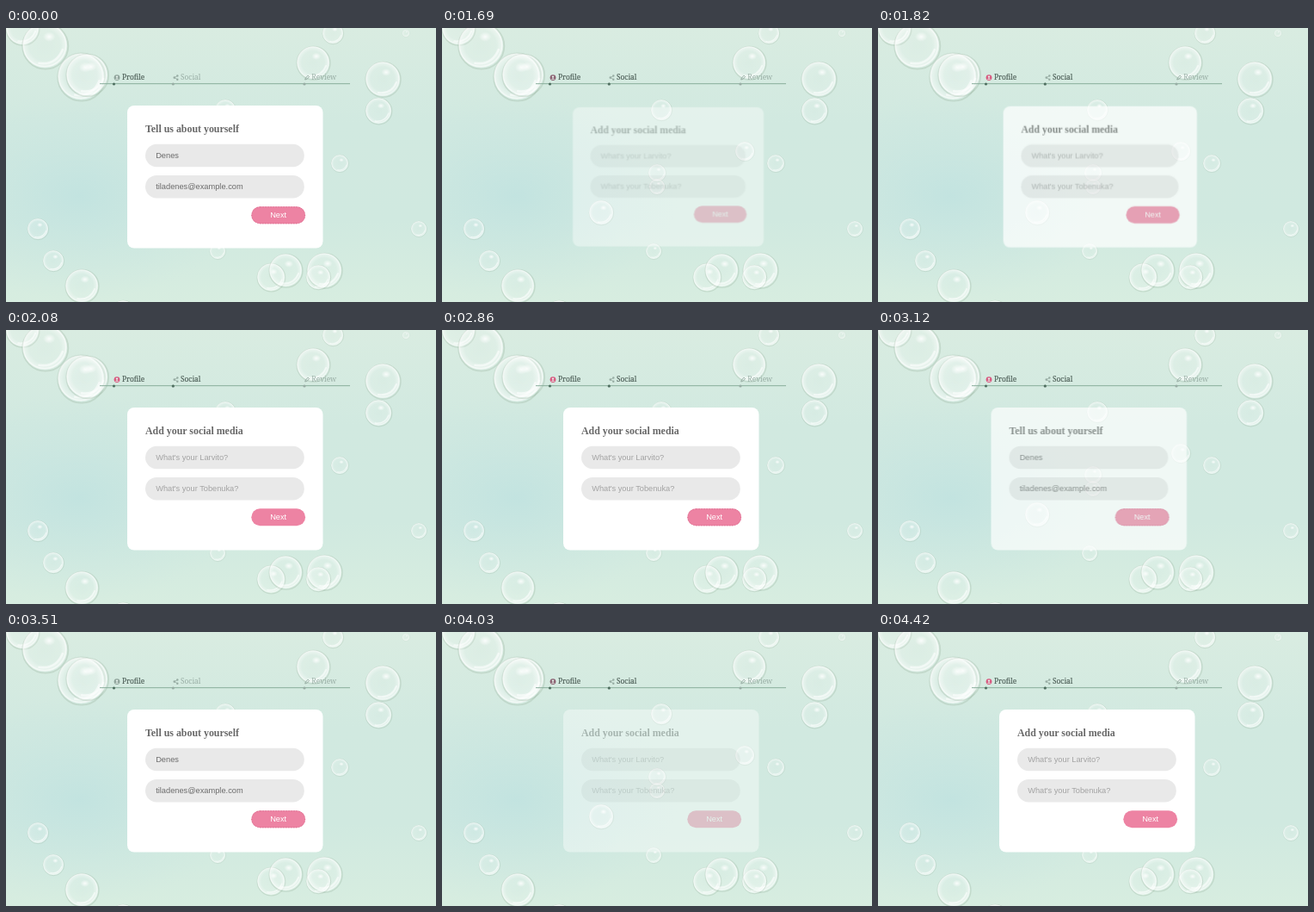
Animation, 500 px wide and 318 px high, one loop 5.07 s. Source, as an HTML page:

```html
<!DOCTYPE html>
<html lang="en">
<head>
<meta charset="utf-8">
<title>Step form</title>
<style>
  html, body { margin: 0; width: 100%; height: 100%; overflow: hidden; background: #d3eae0; }
  svg { display: block; width: 100%; height: 100%; }
  .nav { font: 8.3px "Noto Serif", serif; }
  .title { font: bold 11.9px "Liberation Serif", "Times New Roman", serif; fill: #686868; }
  .field, .next { font: 9.25px "Liberation Sans", Arial, sans-serif; }
  .next { fill: #fff; text-anchor: middle; }
  .card { transform-box: fill-box; transform-origin: center; }
  .muted { fill: #98ada4; color: #98ada4; }
  .active { fill: #4b5c55; stroke: #4b5c55; stroke-width: .15; }
</style>
</head>
<body>
<svg viewBox="0 0 500 318" preserveAspectRatio="none">
  <defs>
    <linearGradient id="sky" x2="0" y2="1">
      <stop offset="0" stop-color="#d9ece1"/>
      <stop offset=".35" stop-color="#d1e9e0"/>
      <stop offset=".7" stop-color="#d0e9e0"/>
      <stop offset="1" stop-color="#d7ede0"/>
    </linearGradient>
    <radialGradient id="pool">
      <stop offset="0" stop-color="#bfe2e0" stop-opacity=".8"/>
      <stop offset="1" stop-color="#c8e5e1" stop-opacity="0"/>
    </radialGradient>
    <radialGradient id="film">
      <stop offset="0" stop-color="#fff" stop-opacity=".1"/>
      <stop offset=".7" stop-color="#fff" stop-opacity=".16"/>
      <stop offset=".93" stop-color="#fff" stop-opacity=".5"/>
      <stop offset="1" stop-color="#fff" stop-opacity=".3"/>
    </radialGradient>
    <radialGradient id="glow">
      <stop offset="0" stop-color="#fff" stop-opacity=".85"/>
      <stop offset="1" stop-color="#fff" stop-opacity="0"/>
    </radialGradient>
    <g id="bubble">
      <circle cx=".03" cy=".04" r="1.02" fill="none" stroke="#8fa894" stroke-opacity=".28" stroke-width=".07"/>
      <circle r="1" fill="url(#film)"/>
      <circle r=".95" fill="none" stroke="#fff" stroke-opacity=".5" stroke-width=".05"/>
      <ellipse cx=".2" cy="-.38" rx=".28" ry=".22" fill="url(#glow)"/>
      <path d="M-.25 .8Q.5 .9 .8 .2" fill="none" stroke="#fff" stroke-opacity=".55" stroke-width=".1" stroke-linecap="round"/>
    </g>
  </defs>

  <rect width="500" height="318" fill="url(#sky)"/>
  <ellipse cx="85" cy="195" rx="190" ry="120" fill="url(#pool)"/>
  <g id="bubbles"></g>

  <g class="nav">
    <path d="M109 64.7H400" stroke="#88ad9a"/>
    <g fill="#4f6f60">
      <circle cx="125.5" cy="65" r="1.6"/>
      <circle class="muted" cx="194.3" cy="65" r="1.6"/>
      <circle id="socialDot" cx="194.3" cy="65" r="1.6"/>
      <circle class="muted" cx="347" cy="65" r="1.6"/>
    </g>
    <g id="person">
      <circle cx="129" cy="57.6" r="3.4"/>
      <circle cx="129" cy="56.6" r="1.2" fill="#e4f1ea"/>
      <path d="M126.9 59.8Q129 56.8 131.1 59.8Z" fill="#e4f1ea"/>
    </g>
    <text class="active" x="135" y="60.2">Profile</text>
    <g class="muted">
      <path d="M199.3 55.5L195.8 57.6L199.3 59.7" fill="none" stroke="currentColor" stroke-width=".8"/>
      <circle cx="199.3" cy="55.5" r="1.2"/>
      <circle cx="195.8" cy="57.6" r="1.3"/>
      <circle cx="199.3" cy="59.7" r="1.2"/>
      <text id="socialIdle" x="203" y="60.2">Social</text>
      <path d="M347.7 60L348.4 58L351.2 55.1L352.7 56.6L349.8 59.4Z" fill="none" stroke="currentColor" stroke-width="1"/>
      <text x="355.3" y="60.2">Review</text>
    </g>
    <text id="socialActive" class="active" x="203" y="60.2">Social</text>
  </g>

  <g id="cards"></g>
</svg>
<script>
  const DURATION = 5070, TICKS = 39;
  const byId = id => document.getElementById(id);

  // Centre x, centre y, radius
  const bubbles = [
    [19, 0, 19], [45, 20, 26], [87, 56, 27], [94, 54, 24], [380, 6, 12], [465, 6, 4],
    [357, 40, 19], [438, 59, 20], [433, 96, 15], [388, 157, 10], [480, 233, 9],
    [37, 233, 12], [55, 270, 12], [88, 299, 19], [136, 331, 15], [246, 259, 9],
    [308, 289, 16], [325, 281, 19], [370, 281, 20], [363, 289, 14],
    [255, 95, 12], [352, 143, 11], [250, 168, 10], [250, 184, 9], [185, 214, 14]
  ];
  byId('bubbles').innerHTML = bubbles.map(([x, y, r]) =>
    `<use href="#bubble" transform="translate(${x} ${y}) scale(${r})"/>`).join('');

  const field = (y, text, color) => `
    <rect x="162" y="${y}" width="184.8" height="26.4" rx="13.2" fill="#e9e9e9"/>
    <text class="field" x="174.2" y="${y + 16}" fill="${color}">${text}</text>`;

  const card = (id, title, lines, color) => `
    <g id="${id}" class="card">
      <rect x="141" y="90" width="227.5" height="165.5" rx="8" fill="#fff"/>
      <text class="title" x="162" y="121">${title}</text>
      ${field(134.8, lines[0], color)}${field(171, lines[1], color)}
      <rect x="285.3" y="207.3" width="62.8" height="20" rx="10" fill="#ed83a3"/>
      <rect id="${id}Focus" x="285.8" y="207.8" width="61.8" height="19" rx="9.5"
        fill="none" stroke="#d76a8d" stroke-width=".8" stroke-dasharray="1.5 1.5"/>
      <text class="next" x="316.7" y="220.4">Next</text>
    </g>`;

  byId('cards').innerHTML =
    card('profile', 'Tell us about yourself', ['Denes', 'tiladenes@example.com'], '#6b6b6b') +
    card('social', 'Add your social media', ["What's your Larvito?", "What's your Tobenuka?"], '#a3a3a3');

  // Each step is [tick, styles] and holds until the next one.
  function play(id, steps) {
    const frames = steps.map(([tick, style]) => ({ offset: tick / TICKS, easing: 'step-end', ...style }));
    frames.push({ ...frames.at(-1), offset: 1 });
    byId(id).animate(frames, { duration: DURATION, iterations: Infinity });
  }
  const pose = (opacity, shift = 0, scale = 1) =>
    ({ opacity, transform: `translateX(${shift}px) scale(${scale})` });
  const fade = (...steps) => steps.map(([tick, opacity]) => [tick, { opacity }]);

  play('profile', [
    [0, pose(1)], [13, pose(0)],
    [23, pose(.4, -20)], [24, pose(.68, -9.5)], [25, pose(.9, -3)], [26, pose(1)],
    [31, pose(0)]
  ]);
  play('social', [
    [0, pose(0)],
    [13, pose(.4, 8.3, .976)], [14, pose(.72, 3.5, .99)], [15, pose(.93, .8, .998)], [16, pose(1)],
    [23, pose(0)],
    [31, pose(.4)], [32, pose(.7)], [33, pose(.92)], [34, pose(1)]
  ]);
  play('socialFocus', fade([0, 0], [22, 1], [23, 0]));

  const stepDone = fade([0, 0], [13, 1], [25, .5], [26, 0], [31, 1]);
  play('socialActive', stepDone);
  play('socialDot', stepDone);
  play('socialIdle', stepDone.map(([tick, s]) => [tick, { opacity: 1 - s.opacity }]));
  const grey = { fill: '#8fa39b' }, mixed = { fill: '#8a5f70' }, pink = { fill: '#d8587f' };
  play('person', [
    [0, grey], [13, mixed], [14, pink], [25, mixed], [26, grey], [31, mixed], [32, pink]
  ]);
</script>
</body>
</html>
```
